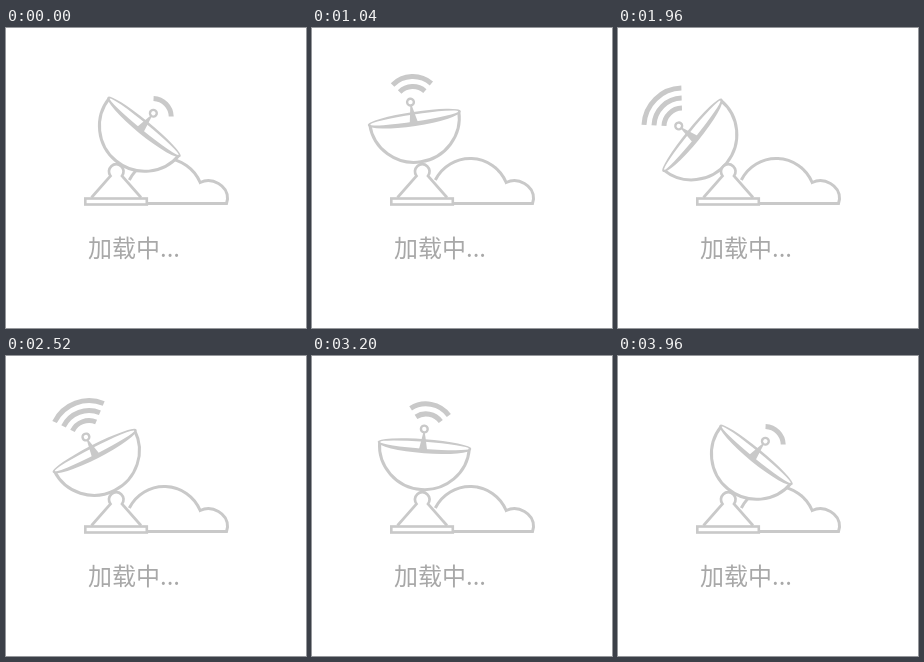
Animation, 300 px wide and 300 px high, one loop 4 s. Source, as an HTML page:

```html
<!DOCTYPE html>
<html lang="zh">
<head>
<meta charset="utf-8">
<style>
  html, body { margin: 0; width: 100%; height: 100%; overflow: hidden; background: #fff; }
  svg { display: block; width: 100vw; height: 100vh; }
  .line { fill: #fff; stroke: #c9c9c9; stroke-width: 3; }
  .wave { fill: none; stroke: #c9c9c9; stroke-width: 5; }
  .solid { fill: #c9c9c9; }
  text { font: 24px "Noto Sans CJK SC", "Noto Sans CJK", sans-serif; fill: #a8a8a8; }
</style>
</head>
<body>
<svg viewBox="0 0 300 300">
  <path class="line" d="M123.3 152A39 39 0 0 1 194.2 154.5C206 149 222 157 221.5 171L220.5 175.5H140"/>

  <!-- Dish coordinates are relative to its pivot, facing straight up -->
  <g id="dish">
    <g transform="translate(-.8 -45.5) rotate(.7)">
      <path class="line" d="M-45 0A45 44.3 0 0 0 45 0"/>
      <!-- Rim with a heavier front edge -->
      <ellipse fill="#fff" rx="46" ry="5"/>
      <path class="solid" fill-rule="evenodd"
        d="M-47 0A47 6.2 0 0 1 47 0A47 8 0 0 1 -47 0ZM-44.5 0A44.5 3.6 0 0 1 44.5 0A44.5 3.6 0 0 1 -44.5 0Z"/>
    </g>
    <path class="solid" d="M-2.8 -58H-1.2L2.3 -40H-6.3Z"/>
    <circle class="line" cx="-2" cy="-61.8" r="3.4" style="stroke-width:2.4"/>
    <g id="waves" transform="translate(-.2 -58.5) rotate(7)"></g>
  </g>

  <path class="line" d="M85.5 169.5L104.5 148A7.3 7.3 0 1 1 116 148L135 169.5" style="stroke-width:2.7"/>
  <rect class="line" x="79.3" y="170.5" width="61.5" height="6" style="stroke-width:2.6"/>
  <text x="82" y="228.8">加载中...</text>
</svg>
<script>
  const LOOP = 4000, STEP = 40, TURN = 1980;
  const HALF_SPAN = 43 * Math.PI / 180;
  const dish = document.getElementById("dish");
  const waves = document.getElementById("waves");

  // Signal arcs, each nearly a quarter circle
  const arcs = [18.5, 28.5, 38.5].map(radius => {
    const arc = document.createElementNS("http://www.w3.org/2000/svg", "path");
    const x = radius * Math.sin(HALF_SPAN), y = -radius * Math.cos(HALF_SPAN);
    arc.setAttribute("class", "wave");
    arc.setAttribute("d", `M${-x} ${y}A${radius} ${radius} 0 0 1 ${x} ${y}`);
    waves.append(arc);
    return arc;
  });

  function waveCount(time) {
    if (time < 600 || time >= 3600) return 1;
    return time >= 1800 && time < 3000 ? 3 : 2;
  }

  function draw(now) {
    const time = Math.floor((now % LOOP) / STEP) * STEP;
    const angle = -52.5 + Math.abs(time - TURN) * 0.046;
    dish.setAttribute("transform", `translate(110.4 134.8) rotate(${angle})`);
    const count = waveCount(time);
    arcs.forEach((arc, i) => arc.style.display = i < count ? "" : "none");
  }

  const start = performance.now();
  function tick() {
    draw(performance.now() - start);
    requestAnimationFrame(tick);
  }
  tick();
</script>
</body>
</html>
```
